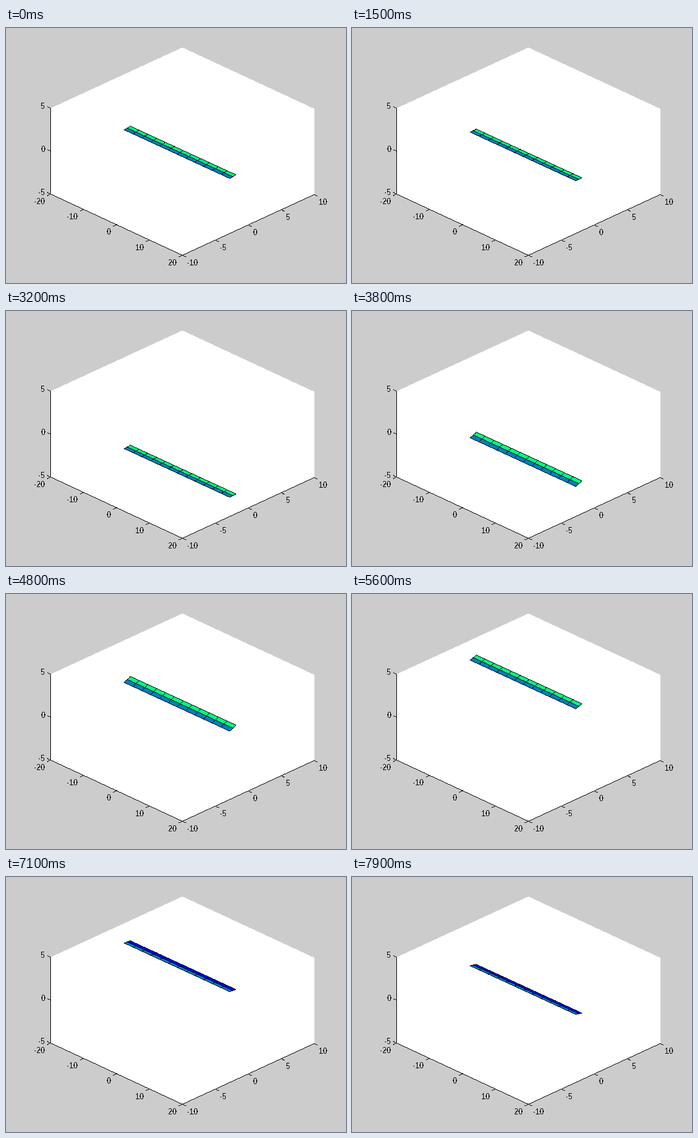
Write a matplotlib script that moves like this. It is 560 px wide and 420 px high and loops after 8 s.

```python
import numpy as np
import matplotlib.pyplot as plt
from matplotlib.animation import FuncAnimation

W, H, DPI = 560, 420, 100
STEP, HOLD, FRAMES = 100, 9, 80
CELLS = 12
GREY, WHITE, BLACK = (204,) * 3, (255,) * 3, (0,) * 3

plt.rcParams.update({"font.family": "Liberation Sans",
                     "font.size": 13 * 72 / DPI,
                     "text.hinting": "native",
                     "text.hinting_factor": 1,
                     "text.antialiased": False})
fig = plt.figure(figsize=(W / DPI, H / DPI), dpi=DPI)
ax = fig.add_axes([0, 0, 1, 1])
ax.set_axis_off()
YY, XX = np.mgrid[:H, :W]


def project(x, y, z):
    """Pixel position of a point in the 3D box."""
    return np.array([290 + 5.425 * x + 10.85 * y,
                     202.7 + 2.52 * x - 5.0 * y - 14.15 * z])


def line(img, p, q):
    """Crisp line, one pixel wide."""
    n = int(np.ceil(np.abs(np.subtract(q, p)).max())) + 1
    x, y = np.rint(np.linspace(p, q, n)).astype(int).T
    img[y, x] = BLACK


def fill(img, corners, color):
    """Convex polygon, corners clockwise on screen."""
    inside = np.ones((H, W), bool)
    for (x0, y0), (x1, y1) in zip(corners, corners[1:] + corners[:1]):
        inside &= (x1 - x0) * (YY - y0) >= (y1 - y0) * (XX - x0)
    img[inside] = color


base = np.full((H, W, 3), GREY, np.uint8)
hull = [project(*p) for p in [(-20, -10, 5), (-20, 10, 5), (20, 10, 5),
                              (20, 10, -5), (20, -10, -5), (-20, -10, -5)]]
fill(base, hull, WHITE)
for a, b in [(0, 5), (5, 4), (4, 3)]:
    line(base, hull[a], hull[b])


def add_ticks(values, place, tick, label, align):
    for v in values:
        p = place(v)
        line(base, p, p + tick)
        ax.text(*(p + label), str(v), ha=align, va="baseline")


add_ticks(range(-20, 21, 10), lambda v: project(v, -10, -5),
          (-5.5, 2.6), (-9, 16.5), "right")
add_ticks(range(-10, 11, 5), lambda v: project(20, v, -5),
          (5.5, 2.6), (8, 16.5), "left")
add_ticks((-5, 0, 5), lambda v: project(-20, -10, v),
          (-5.5, -2.6), (-9, 1), "right")


def pose(k):
    """Height of the front edge and tilt of the plate, in pixels."""
    fade = np.exp(-(k / 30) ** 4)
    swell = 1 - fade * np.cos(np.pi * k / 47.6)
    heave = 72 * swell * np.sin(np.pi * (k - 35.4) / 38.3)
    pitch = 1.2 + 3.9 * (np.cos(np.pi * (k - 36) / 37)
                         + fade * np.cos(np.pi * k / 19))
    return 167.2 - heave, pitch


def winter(v):
    return 0, round(255 * v), round(255 * (1 - v / 2))


picture = ax.imshow(base, aspect="auto", interpolation="nearest")


def update(n):
    front, pitch = pose(max(0, n - HOLD))
    chord = np.array([10.2, -4.95 - pitch])
    span = np.array([174, 80.2])
    left = [np.array([194.2, front]) + chord * s for s in (1, 0.5, 0)]
    right = [p + span for p in left]

    img = base.copy()
    for i, shade in enumerate((1 if pitch > 0 else 0, 0.5)):
        fill(img, [left[i], right[i], right[i + 1], left[i + 1]],
             winter(shade))
    for p, q in zip(left, right):
        line(img, p, q)
    for u in np.linspace(0, 1, CELLS + 1):
        line(img, left[0] + u * span, left[2] + u * span)
    picture.set_data(img)
    return [picture]


anim = FuncAnimation(fig, update, frames=FRAMES, interval=STEP,
                     init_func=lambda: update(0), repeat=True,
                     repeat_delay=0, blit=False)
plt.show()
```
